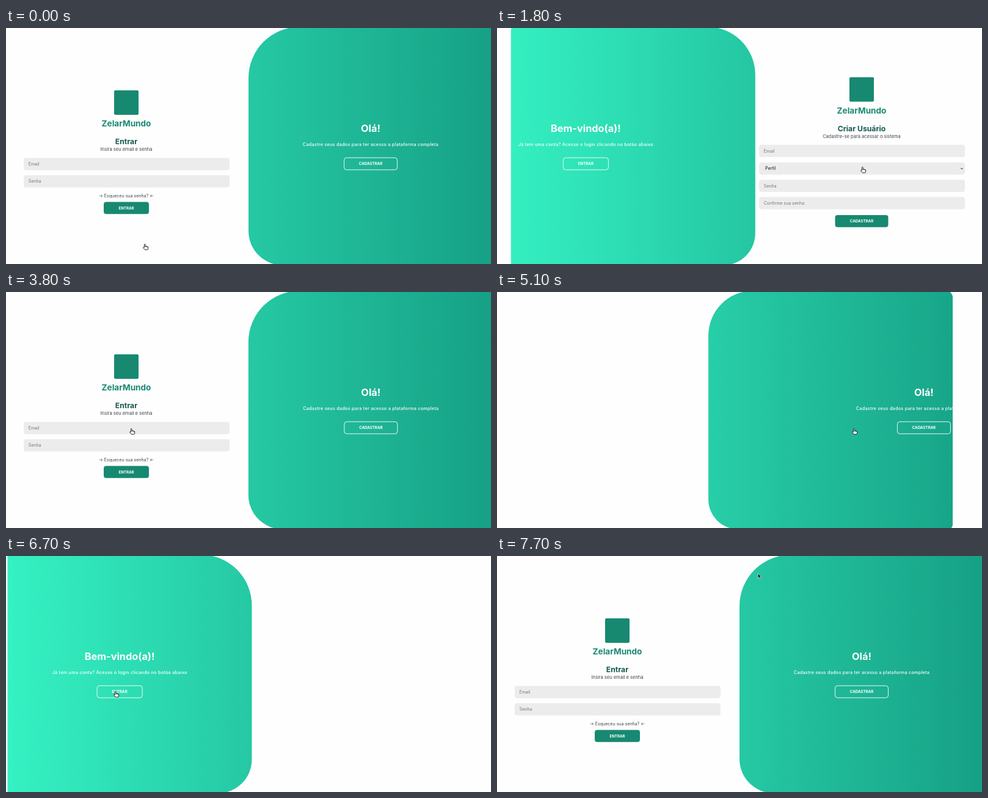
An HTML page that plays this animation: 794x386 px, repeating every 7.8 s.

```html
<!DOCTYPE html>
<html lang="pt-BR">
<head>
<meta charset="utf-8">
<title>Login</title>
<style>
  html, body { margin: 0; width: 100%; height: 100%; overflow: hidden; background: #fefefe; }
  svg { display: block; width: 100vw; height: 100vh; }
  text { font: 7.5px Inter, sans-serif; fill: #3f4549; text-anchor: middle; }
  .brand { font-size: 13.6px; font-weight: 700; fill: #1a8a73; }
  .title { font-size: 12.2px; font-weight: 700; fill: #17594f; }
  .hint { font-size: 7px; fill: #757678; text-anchor: start; }
  .select { fill: #111; }
  .link { font-size: 7.05px; }
  .label { font-size: 6.15px; font-weight: 700; fill: #fff; }
  .heading { font-size: 16.3px; font-weight: 700; fill: #fff; }
  .lead { font-size: 7.2px; font-weight: 500; letter-spacing: .28px; fill: #fff; }
</style>
</head>
<body>
<svg id="stage" viewBox="0 0 794 386"></svg>
<script>
const LOOP = 7800, STEP = 100, SLIDE = 600;
const PANEL = { x: 397, y: -2, width: 400, height: 390, upper: 84, lower: 56 };
const LEFT = 197, RIGHT = 597;

// Moments at which the panel starts sliding, and the side it slides to (1 = left)
const switches = [[1307, 1], [3209, 0], [4951, 1], [6650, 0]];

// Pointer path: time, x, y
const pointerKeys = [
  [0, 229, 358], [200, 229, 358], [1000, 600, 232], [1900, 600, 232],
  [2800, 207, 228], [4200, 207, 228], [4800, 586, 228], [5800, 586, 228],
  [6400, 181, 226], [7350, 181, 226], [7700, 428, 32]
];

const text = (cls, x, y, content) => `<text class="${cls}" x="${x}" y="${y}">${content}</text>`;

const button = (cx, top, width, label, paint) =>
  `<rect x="${cx - width / 2}" y="${top}" width="${width}" height="19.7" rx="4" ${paint}/>` +
  text('label', cx, top + 12.2, label);

const field = (x, top, hint, cls = '') =>
  `<rect x="${x}" y="${top}" width="337" height="20" rx="4" fill="#ececed"/>` +
  text('hint ' + cls, x + (cls ? 10 : 7.7), top + 12.6, hint);

const header = (cx, top, title, subtitle) =>
  `<rect x="${cx - 20}" y="${top}" width="40" height="40" rx="2" fill="#178971"/>` +
  text('brand', cx, top + 59, 'ZelarMundo') +
  text('title', cx, top + 88, title) +
  text('', cx, top + 99, subtitle);

const welcome = (cx, heading, lead, label, width) =>
  text('heading', cx, 170, heading) + text('lead', cx, 193.4, lead) +
  button(cx, 212.2, width, label, 'fill="none" stroke="#fff" stroke-width=".9"');

const solid = 'fill="#178971"';

document.getElementById('stage').innerHTML = `
  <defs>
    <linearGradient id="green" gradientUnits="userSpaceOnUse" x1="-3" x2="797">
      <stop stop-color="#35f2c3"/><stop offset="1" stop-color="#16a085"/>
    </linearGradient>
    <clipPath id="clip"><path id="outline"/></clipPath>
  </defs>
  <g id="login">
    ${header(LEFT, 102, 'Entrar', 'Insira seu email e senha')}
    ${field(29, 212.5, 'Email')}
    ${field(29, 240.7, 'Senha')}
    ${text('link', LEFT, 277, '→ Esqueceu sua senha? ←')}
    ${button(LEFT, 284.5, 74, 'ENTRAR', solid)}
  </g>
  <g id="signup">
    ${header(RIGHT, 80.5, 'Criar Usuário', 'Cadastre-se para acessar o sistema')}
    ${field(429, 191, 'Email')}
    ${field(429, 219.7, 'Perfil', 'select')}
    <path d="M759 229l2 2 2-2" fill="none" stroke="#222" stroke-width=".9"/>
    ${field(429, 248.3, 'Senha')}
    ${field(429, 276.5, 'Confirme sua senha')}
    ${button(RIGHT, 306, 87, 'CADASTRAR', solid)}
  </g>
  <g clip-path="url(#clip)">
    <rect x="-3" y="-2" width="800" height="390" fill="url(#green)"/>
    <g id="back">${welcome(LEFT, 'Bem-vindo(a)!',
      'Já tem uma conta? Acesse o login clicando no botão abaixo', 'ENTRAR', 74)}</g>
    <g id="hello">${welcome(RIGHT, 'Olá!',
      'Cadastre seus dados para ter acesso a plataforma completa', 'CADASTRAR', 87)}</g>
  </g>
  <g id="pointer">
    <path id="hand" fill="#fff" stroke="#111" stroke-width=".9" stroke-linejoin="round"
      d="M-2.6-3.6q0-1 .9-1t.9 1v2.4l3.5.7q1.2.3 1.1 1.5l-.3 2-.8 1.8h-4.2l-3-3.4q.1-1.1 1.1-.8l.8.6z
         M-.8-1.2v1.3M.9-.8V.3M2.5-.5v1"/>
    <path id="arrow" fill="#111" stroke="#fff" stroke-width=".6"
      d="M-.8-3.6v8l1.8-1.7 1.2 2.7 1.3-.6-1.2-2.6h2.4z"/>
  </g>`;

const part = Object.fromEntries(
  [...document.querySelectorAll('[id]')].map(node => [node.id, node]));
const show = (node, on) => node.setAttribute('visibility', on ? 'visible' : 'hidden');
const move = (node, x, y = 0) => node.setAttribute('transform', `translate(${x} ${y})`);

// cubic-bezier(.42, 0, .58, 1), solved by bisection
function easeInOut(x) {
  if (x <= 0) return 0;
  if (x >= 1) return 1;
  let low = 0, high = 1, s;
  for (let i = 0; i < 24; i++) {
    s = (low + high) / 2;
    const at = 1.26 * (1 - s) ** 2 * s + 1.74 * (1 - s) * s * s + s ** 3;
    if (at < x) low = s; else high = s;
  }
  return s * s * (3 - 2 * s);
}

function panelPath(slide) {
  const { y, width, height, upper, lower } = PANEL;
  const left = PANEL.x - width * slide, right = left + width, bottom = y + height;
  const stay = 1 - slide;
  const tl = upper * stay, bl = lower * stay, tr = upper * slide, br = lower * slide;
  const arc = (r, x, y) => `A${r} ${r} 0 0 1 ${x} ${y}`;
  return `M${left + tl} ${y}H${right - tr}${arc(tr, right, y + tr)}V${bottom - br}` +
    `${arc(br, right - br, bottom)}H${left + bl}${arc(bl, left, bottom - bl)}V${y + tl}` +
    `${arc(tl, left + tl, y)}Z`;
}

function drawPanel(t) {
  const [start, side] = switches.filter(([at]) => at <= t).pop() || [-SLIDE, 0];
  const eased = easeInOut((t - start) / SLIDE);
  const slide = side ? eased : 1 - eased;
  const formReady = t - start >= SLIDE / 2;
  part.outline.setAttribute('d', panelPath(slide));
  move(part.back, -800 * (1 - slide));
  move(part.hello, 800 * slide);
  show(part.login, formReady && !side);
  show(part.signup, formReady && side);
}

function drawPointer(t) {
  const next = Math.max(1, pointerKeys.findIndex(([at]) => at >= t));
  const [t0, x0, y0] = pointerKeys[next - 1], [t1, x1, y1] = pointerKeys[next];
  const k = (t - t0) / (t1 - t0), eased = k * k * (3 - 2 * k);
  const x = x0 + (x1 - x0) * eased, y = y0 + (y1 - y0) * eased;
  const overButton = pointerKeys.slice(0, -1).some(([, px, py]) => Math.hypot(x - px, y - py) < 20);
  move(part.pointer, x, y);
  show(part.hand, overButton);
  show(part.arrow, !overButton);
}

const origin = performance.now();
function frame() {
  const elapsed = (performance.now() - origin) % LOOP;
  const t = Math.floor(elapsed / STEP) * STEP;
  drawPanel(t);
  drawPointer(t);
  requestAnimationFrame(frame);
}
frame();
</script>
</body>
</html>
```
